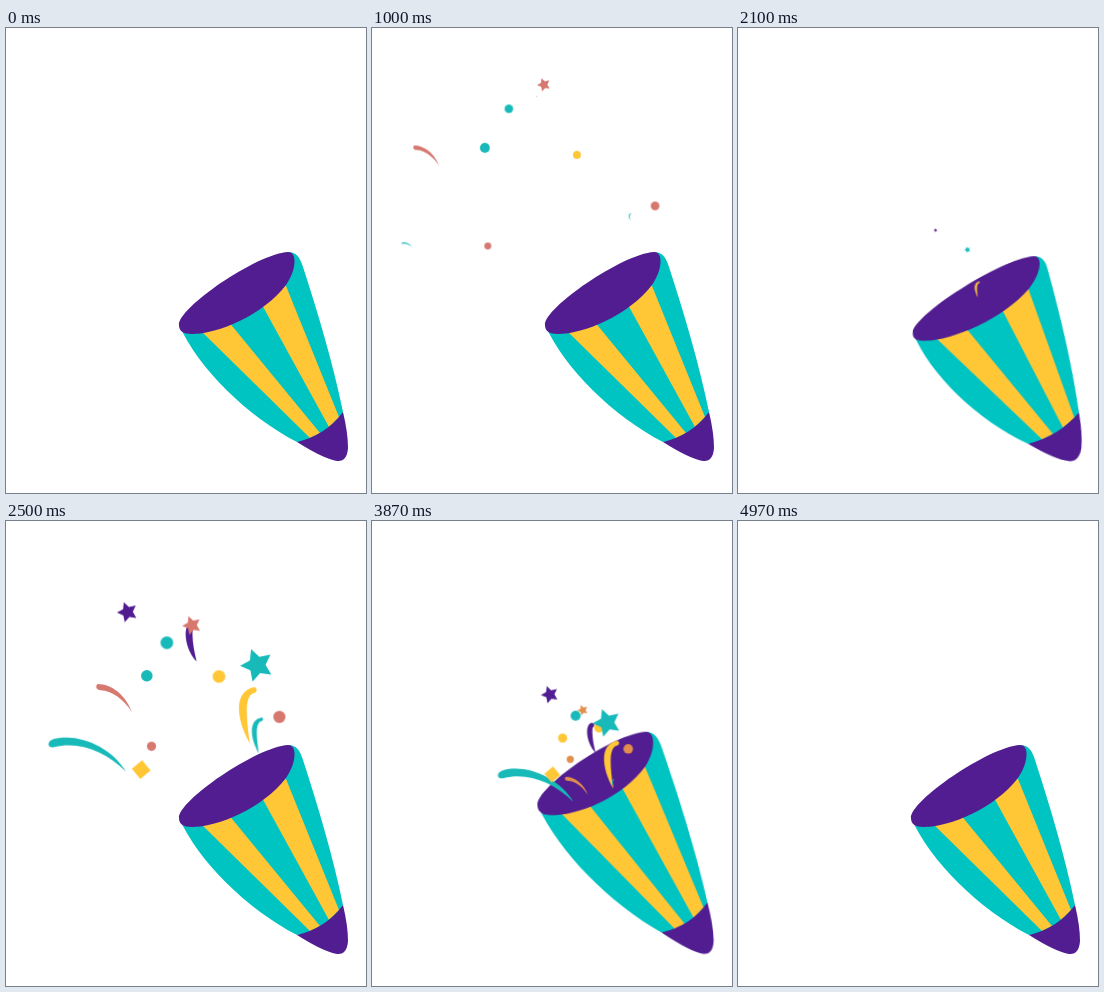
Write an HTML page that moves like this. It is 360x465 px and loops after 5 s.

```html
<!DOCTYPE html>
<html lang="en">
<head>
<meta charset="utf-8">
<title>Party popper</title>
<style>
  html, body { margin: 0; width: 100%; height: 100%; overflow: hidden; background: #fff; }
  svg { display: block; width: 360px; height: 465px; }
  #popper { transform-origin: 335px 433px; animation: squash calc(5s / 3) infinite; }
  #confetti > * { transform-origin: 0 0; animation: calc(5s / 3) linear infinite; }
  @keyframes squash {
    0%, 100% { transform: rotate(-30.7deg) scale(1, 1) rotate(30.7deg); animation-timing-function: ease-in-out; }
    18% { transform: rotate(-26.7deg) scale(1.32, .8) rotate(30.7deg); animation-timing-function: ease-in; }
    26% { transform: rotate(-29.5deg) scale(1.09, .953) rotate(30.7deg); animation-timing-function: ease-out; }
    30%, 32.2% { transform: rotate(-30.7deg) scale(1, 1.074) rotate(30.7deg); animation-timing-function: ease-in-out; }
    40% { transform: rotate(-30.7deg) scale(1, 1) rotate(30.7deg); }
  }
</style>
</head>
<body>
<svg viewBox="0 0 360 465">
  <g id="popper">
    <path fill="#00c4c1" d="M173 297C193 341 241 388 291 414L325 410L337 384C327 335 312 285 297 239C294 229 290 224 282 224Z"/>
    <path fill="#ffc636" d="M194 302L304 410L314 405L222 293ZM255 275L323 399L333 389L278 253Z"/>
    <path fill="#511d91" d="M291 414Q320 407 337 384Q342 405 342 420Q341 434 331 433Q318 431 291 414Z"/>
    <path fill="#511d91" d="M173 297C172 280 250 226 282 224C292 224 290 243 280 257C257 287 212 306 186 306C177 306 173 303 173 297Z"/>
  </g>
  <g id="confetti"></g>
</svg>
<script>
const LOOP = 5000 / 3;
const purple = '#511d91', teal = '#18b9b9', yellow = '#ffc636', orange = '#e08f4d', salmon = '#d6786f';

const polygon = (n, inner, turn) => 'M' + Array.from({ length: n }, (_, i) => {
  const a = i * 2 * Math.PI / n + turn, r = i % 2 ? inner : 1;
  return (r * Math.sin(a)).toFixed(3) + ' ' + (-r * Math.cos(a)).toFixed(3);
}).join('L') + 'Z';

const star = polygon(10, .5, -.36);
const square = polygon(4, 1, .1);
const dot = 'M-1 0A1 1 0 1 1 1 0A1 1 0 1 1 -1 0Z';
const wave = 'M38 16C24 -8 -8 -22 -32 -16C-40 -14 -39 -6 -32 -8C-8 -14 18 -4 38 16Z';
const arc = 'M11 9C7 -2 -2 -9 -11 -9C-13 -7 -11 -5 -9 -5C-2 -5 6 1 11 9Z';
const hook = 'M1 23C-11 2 -13 -22 5 -25C8 -24 7 -20 4 -20C-4 -17 -2 2 1 23Z';
const curl = 'M5 14C-5 4 -6 -15 1 -16C5 -16 4 -13 2 -11C1 -4 3 6 5 14Z';

// from: place at 500 ms, to: place at 1000 ms, size: scale at 500, 537 and 1000 ms
const pieces = [
  { d: wave, fill: teal, from: [174, 269], to: [35, 217], size: [.75, 1, .14], peak: 1.1 },
  { d: arc, fill: orange, end: salmon, from: [217, 276], to: [55, 128], size: [.5, 1, 1.15], peak: 1.6 },
  { d: curl, fill: purple, from: [223, 230], to: [165, 69], size: [.2, 1, .05], peak: 1.4 },
  { d: hook, fill: yellow, from: [240, 251], to: [244, 168], size: [.76, 1, 0], start: 382 },
  { d: hook, fill: teal, from: [240, 268], to: [258, 189], size: [0, .15, .15], peak: .8 },
  { d: square, fill: yellow, from: [186, 254], to: [110, 246], size: [6.5, 8, 0] },
  { d: dot, fill: yellow, from: [229, 213], to: [205, 127], size: [3, 5, 4] },
  { d: star, fill: teal, from: [233, 209], to: [260, 112], size: [12, 14.5, 0], start: 410 },
  { d: star, fill: purple, from: [185, 184], to: [90, 45], size: [7, 9, 0], start: 410 },
  { d: star, fill: orange, end: salmon, from: [214, 200], to: [172, 57], size: [3, 5.5, 7], peak: 10 },
  { d: dot, fill: teal, from: [209, 204], to: [137, 81], size: [3.8, 5, 4.3] },
  { d: dot, fill: yellow, end: teal, from: [197, 225], to: [113, 120], size: [2.6, 4.5, 5] },
  { d: dot, fill: orange, end: salmon, from: [205, 240], to: [116, 218], size: [3, 3.6, 3.5] },
  { d: dot, fill: orange, end: salmon, from: [254, 232], to: [283, 178], size: [4, 4.8, 4.4] }
];

const rules = [];
const confetti = document.getElementById('confetti');

pieces.forEach(({ d, fill, end = fill, from, to, size, start = 433, peak = size[1] * 1.3 }, i) => {
  const gone = size[2] ? 1085 : 970;
  const key = (t, s, color) => {
    const [x, y] = from.map((v, k) => (v + (to[k] - v) * (t - 500) / 500).toFixed(2));
    return `${(t / LOOP * 100).toFixed(3)}%{transform:translate(${x}px,${y}px) scale(${s});fill:${color}}`;
  };
  const keys = [
    key(0, 0, fill), key(start, 0, fill), key(500, size[0], fill), key(537, size[1], fill),
    key(650, peak, fill), key(820, peak, end)
  ];
  if (size[2]) keys.push(key(1000, size[2], end));
  keys.push(key(gone, 0, end), key(LOOP, 0, end));
  rules.push(`@keyframes piece${i}{${keys.join('')}}`);

  const path = document.createElementNS('http://www.w3.org/2000/svg', 'path');
  path.setAttribute('d', d);
  path.style.animationName = 'piece' + i;
  confetti.append(path);
});

const sheet = document.createElement('style');
sheet.textContent = rules.join('\n');
document.head.append(sheet);
</script>
</body>
</html>
```
